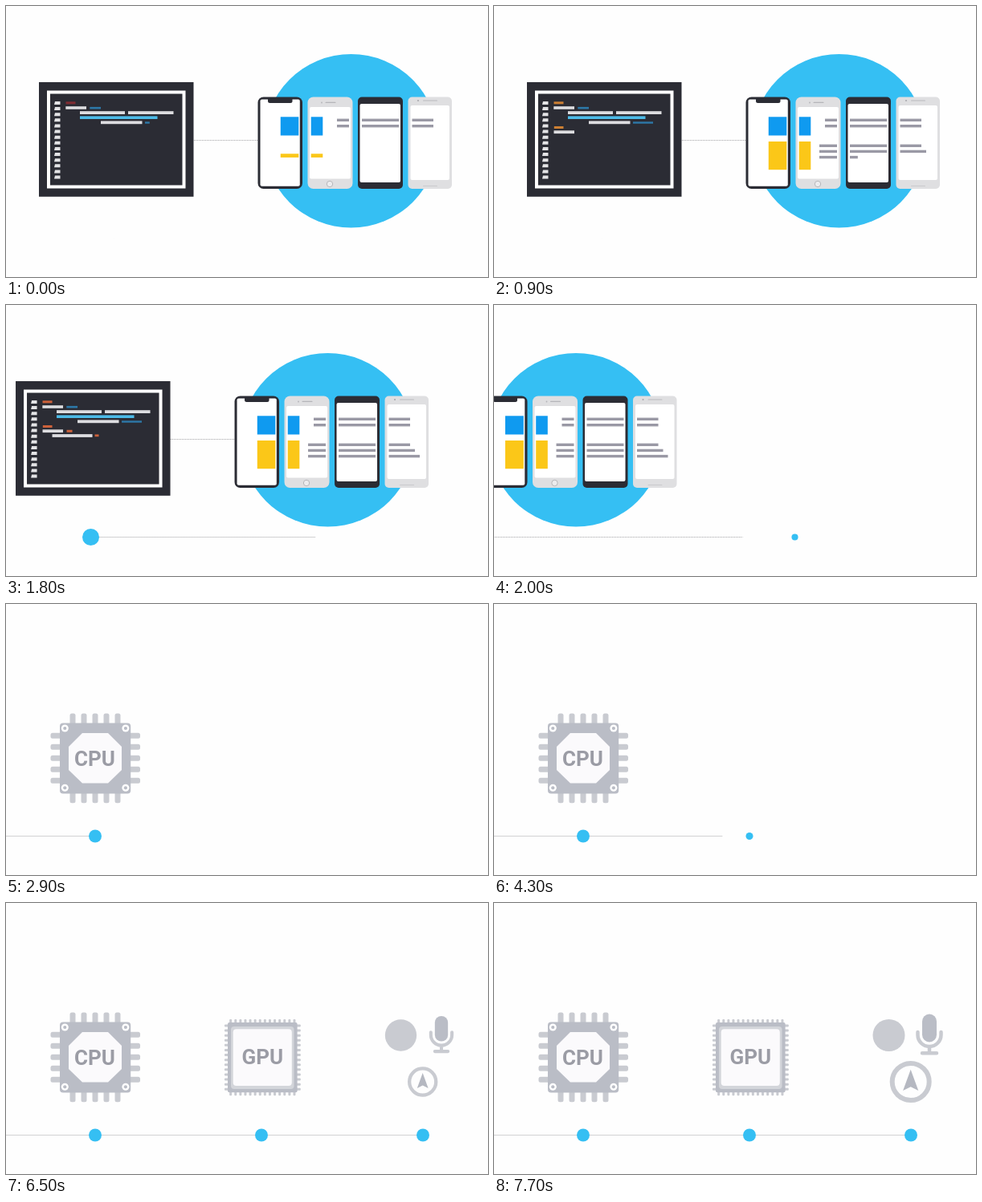
An HTML page that plays this animation: 600 px wide and 338 px high, repeating every 7900 ms.

```html
<!DOCTYPE html>
<html lang="en">
<head>
<meta charset="utf-8">
<title>One codebase, native hardware</title>
<style>
  html, body { margin: 0; width: 100%; height: 100%; overflow: hidden; background: #fefefe; }
  svg { display: block; width: 600px; height: 338px; }
  text { font: 700 26px Roboto, Arial, sans-serif; fill: #9b9ca5; text-anchor: middle; }
</style>
</head>
<body>
<svg id="stage" viewBox="0 0 600 338"></svg>
<script>
const LOOP = 7900, PAN = 591, LINE_Y = 289.5;
const SKY = '#35bff3', INK = '#2b2c34', SHELL = '#dfdfe1', PAPER = '#fefefe';
const CHIP = '#babdc6', PIN = '#c9cbd1';
const stage = document.getElementById('stage');

function el(parent, tag, attrs) {
  const node = document.createElementNS('http://www.w3.org/2000/svg', tag);
  set(node, attrs || {});
  return parent.appendChild(node);
}
function set(node, attrs) {
  for (const key in attrs) node.setAttribute(key, attrs[key]);
}
// Rectangle from its left, top, right and bottom edges.
const box = (parent, x1, y1, x2, y2, fill, rx = 0) =>
  el(parent, 'rect', { x: x1, y: y1, width: x2 - x1, height: y2 - y1, fill, rx });
const disc = (parent, cx, cy, r, fill) => el(parent, 'circle', { cx, cy, r, fill });
const dotted = (parent, x1, x2, y) =>
  el(parent, 'line', { x1, x2, y1: y, y2: y, stroke: '#a3a3a6', 'stroke-dasharray': '1 1' });
const label = (parent, x, y, text) => { el(parent, 'text', { x, y }).textContent = text; };

const clamp = v => Math.max(0, Math.min(1, v));
const progress = (t, start, span) => clamp((t - start) / span);
const inOut = p => p < .5 ? 4 * p ** 3 : 1 - 4 * (1 - p) ** 3;
const out = p => 1 - (1 - p) ** 3;
function keyed(t, keys) {
  if (t <= keys[0][0]) return keys[0][1];
  for (let i = 1; i < keys.length; i++) {
    const [t0, v0] = keys[i - 1], [t1, v1] = keys[i];
    if (t <= t1) return v0 + (v1 - v0) * (t - t0) / (t1 - t0);
  }
  return keys[keys.length - 1][1];
}

const world = el(stage, 'g');

// Code editor
box(world, 41, 95, 233.5, 237.8, INK);
el(world, 'rect', { x: 53, y: 107.5, width: 168.5, height: 118, fill: INK, stroke: '#fff', 'stroke-width': 4 });
for (let i = 0; i < 14; i++) {
  const y = 119 + i * 7.12;
  el(world, 'path', { d: `M61 ${y}h6.5v4h-7.5z`, fill: '#e4e4e6' });
}
const WHITE = '#dddde0', BLUE = '#2d78a8', ORANGE = '#cc7f2e';
// left, right, middle, height, colour, typing start, typing time
const code = [
  [74.5, 86.5, 120.8, 3, ORANGE, -1, 1],
  [74.3, 100, 127, 3.6, WHITE, -1, 1],
  [104.3, 118, 127.2, 2.6, BLUE, -1, 1],
  [92, 148, 133.1, 3.8, WHITE, -1, 1],
  [152, 208.5, 133.1, 3.8, WHITE, -1, 1],
  [92, 188.5, 139.2, 3.6, '#4cbbe8', -1, 1],
  [118, 169.5, 145.3, 3.8, WHITE, -1, 1],
  [173, 198, 145.5, 2.4, BLUE, -80, 350],
  [74.8, 86.5, 151.5, 3, ORANGE, 400, 150],
  [74.5, 100, 157.2, 3.8, WHITE, 600, 250],
  [104.5, 111.5, 157.3, 3, ORANGE, 1000, 120],
  [86.5, 136.5, 163, 3.8, WHITE, 1150, 350],
  [139.5, 144.5, 162.8, 2.8, ORANGE, 1550, 120]
].map(([x1, x2, y, h, fill, start, span]) => ({
  node: box(world, x1, y - h / 2, x2, y + h / 2, fill),
  width: x2 - x1, start, span, warm: fill === ORANGE
}));

// Phones
dotted(world, 234, 314, 167.5);
disc(world, 429.5, 168.3, 108.3, SKY);
function phone(x, width, shell, screen, rx) {
  box(world, x, 113.5, x + width, 228, shell, rx);
  box(world, ...screen, '#fff', 2);
}
phone(313.5, 55.5, INK, [316.5, 116.5, 365.8, 224.7], 7);
box(world, 326, 114, 356.5, 121, INK, 2.5);
phone(375.5, 56, SHELL, [378, 126, 429, 215.5], 7);
box(world, 397.5, 119.8, 410.5, 121, '#b5b5b9', .6);
disc(world, 393, 120.5, .9, '#b5b5b9');
el(world, 'circle', { cx: 403, cy: 222, r: 3.7, fill: '#ececee', stroke: '#b0b0b4', 'stroke-width': .9 });
phone(438, 56, INK, [440.5, 122, 491, 220], 5);
phone(500.5, 54.5, SHELL, [503.5, 124, 552, 217], 5);
box(world, 519, 117.4, 537, 118.6, '#b9b9bd', .6);
disc(world, 513, 118, 1.1, '#aaaab0');
box(world, 519, 224, 537, 225, '#c9c9cc', .5);

// One wide layout seen through the four screens
const windows = el(el(stage, 'defs'), 'clipPath', { id: 'screens' });
[[341.5, 364.3], [379.7, 427], [443, 489], [505.5, 552]]
  .forEach(([a, b]) => box(windows, a, 116, b, 224, '#000'));
const layout = el(world, 'g', { 'clip-path': 'url(#screens)' });
box(layout, 341.5, 138.3, 394.3, 161.5, '#0f9af0');
for (const y of [142.3, 149.7]) box(layout, 412, y - 1.7, 532, y + 1.7, '#9a99a5');
const card = box(layout, 341.5, 184, 394.3, 188.5, '#fbc718');
const rows = [174.3, 181.4, 188.6].map(y => box(layout, 405, y - 1.7, 532, y + 1.7, '#9a99a5'));

// Timeline
const track = dotted(world, 134.5, 134.5, LINE_Y);
const pop = (start, peak) => [[start, 0], [start + 180, peak], [start + 360, 8]];
const dots = [
  [134.5, [[1480, 0], [1600, 15], [1800, 10.5], [1950, 8]]],
  [PAN + 111, [[1940, 0], [2000, 4], [2130, 12], [2320, 8]]],
  [PAN + 318, pop(4230, 11.5)],
  [PAN + 519, pop(6130, 11.5)]
].map(([x, keys]) => ({ node: disc(world, x, LINE_Y, 0, SKY), keys }));

// Hardware
const hardware = el(world, 'g', { transform: `translate(${PAN})` });
const parts = [];
function part(cx, cy, start, span) {
  const node = el(hardware, 'g');
  parts.push({ node, cx, cy, start, span });
  return node;
}

const cpu = part(111, 192.5, 2440, 450);
for (let i = -2; i <= 2; i++) {
  const x = 111 + i * 14, y = 192.3 + i * 14;
  box(cpu, x - 3.5, 136.5, x + 3.5, 248.2, PIN, 2.5);
  box(cpu, 55.5, y - 3.5, 167, y + 3.5, PIN, 2.5);
}
box(cpu, 67, 148.5, 155.2, 236.5, CHIP, 4);
for (const x of [73.3, 148.9]) for (const y of [155, 229.3]) {
  disc(cpu, x, y, 4.5, '#fff');
  disc(cpu, x, y, 2.1, CHIP);
}
el(cpu, 'path', { d: 'M95 161h32l17 17v29l-17 16.5h-32l-17 -16.5v-29z', fill: '#fbfafc' });
label(cpu, 110.5, 201.8, 'CPU');

const gpu = part(319.3, 192.5, 4380, 450);
for (let i = 0; i < 14; i++) {
  const step = (i - 6.5) * 6.1, x = 319.3 + step, y = 192.6 + step;
  box(gpu, x - 1.5, 145, x + 1.5, 240.3, PIN, 1);
  box(gpu, 272, y - 1.5, 366.8, y + 1.5, PIN, 1);
}
box(gpu, 276, 149, 362.6, 236.3, CHIP, 2);
box(gpu, 280, 154, 358.5, 232, '#d3d5da', 4);
box(gpu, 282.7, 157.3, 355.8, 228, '#fbfafc', 4);
label(gpu, 319.3, 201, 'GPU');

disc(part(491.5, 165, 6240, 350), 491.5, 165, 20, PIN);

const mic = part(542, 164, 6310, 350);
box(mic, 533, 138.5, 551, 173.5, CHIP, 9);
el(mic, 'path', {
  d: 'M527.5 161v3.5a14.5 14.5 0 0 0 29 0v-3.5M542 179v8M533 187.3h18',
  fill: 'none', stroke: PIN, 'stroke-width': 4.5, 'stroke-linecap': 'round'
});

const compass = part(518.7, 223, 6380, 350);
el(compass, 'circle', { cx: 518.7, cy: 223, r: 23, fill: 'none', stroke: PIN, 'stroke-width': 6 });
el(compass, 'path', { d: 'M518.7 207.8L528.3 234L518.7 229.2L509.1 234z', fill: '#b5b8c1' });

const trackKeys = [
  [1550, 134.5], [1800, 413.5], [2000, 636], [2070, PAN + 111],
  [4050, PAN + 111], [4350, PAN + 318], [5950, PAN + 318], [6250, PAN + 519]
];

function draw(t) {
  set(world, { transform: `translate(${-PAN * inOut(progress(t, 1641, 694))})` });

  const red = keyed(t, [[0, 128], [500, 204], [1800, 204]]);
  const green = keyed(t, [[0, 44], [500, 127], [900, 127], [1800, 97]]);
  const blue = keyed(t, [[0, 50], [500, 46], [1800, 58]]);
  for (const c of code) {
    set(c.node, { width: c.width * progress(t, c.start, c.span) });
    if (c.warm) set(c.node, { fill: `rgb(${red},${green},${blue})` });
  }

  const half = 2.2 + 15.4 * out(progress(t, 0, 400));
  set(card, { y: 186.6 - half, height: 2 * half });
  rows.forEach((row, i) => {
    set(row, { width: (127 + 6 * i) * inOut(progress(t, 260 + 230 * i, 410)) });
  });

  set(track, { x2: keyed(t, trackKeys) });
  for (const d of dots) set(d.node, { r: keyed(t, d.keys) });

  for (const p of parts) {
    const k = out(progress(t, p.start, p.span));
    set(p.node, {
      transform: `translate(${p.cx} ${p.cy}) scale(${k}) translate(${-p.cx} ${-p.cy})`,
      opacity: clamp(k * 1.5)
    });
  }
}

const began = performance.now();
function tick() {
  draw((performance.now() - began) % LOOP);
  requestAnimationFrame(tick);
}
tick();
</script>
</body>
</html>
```
